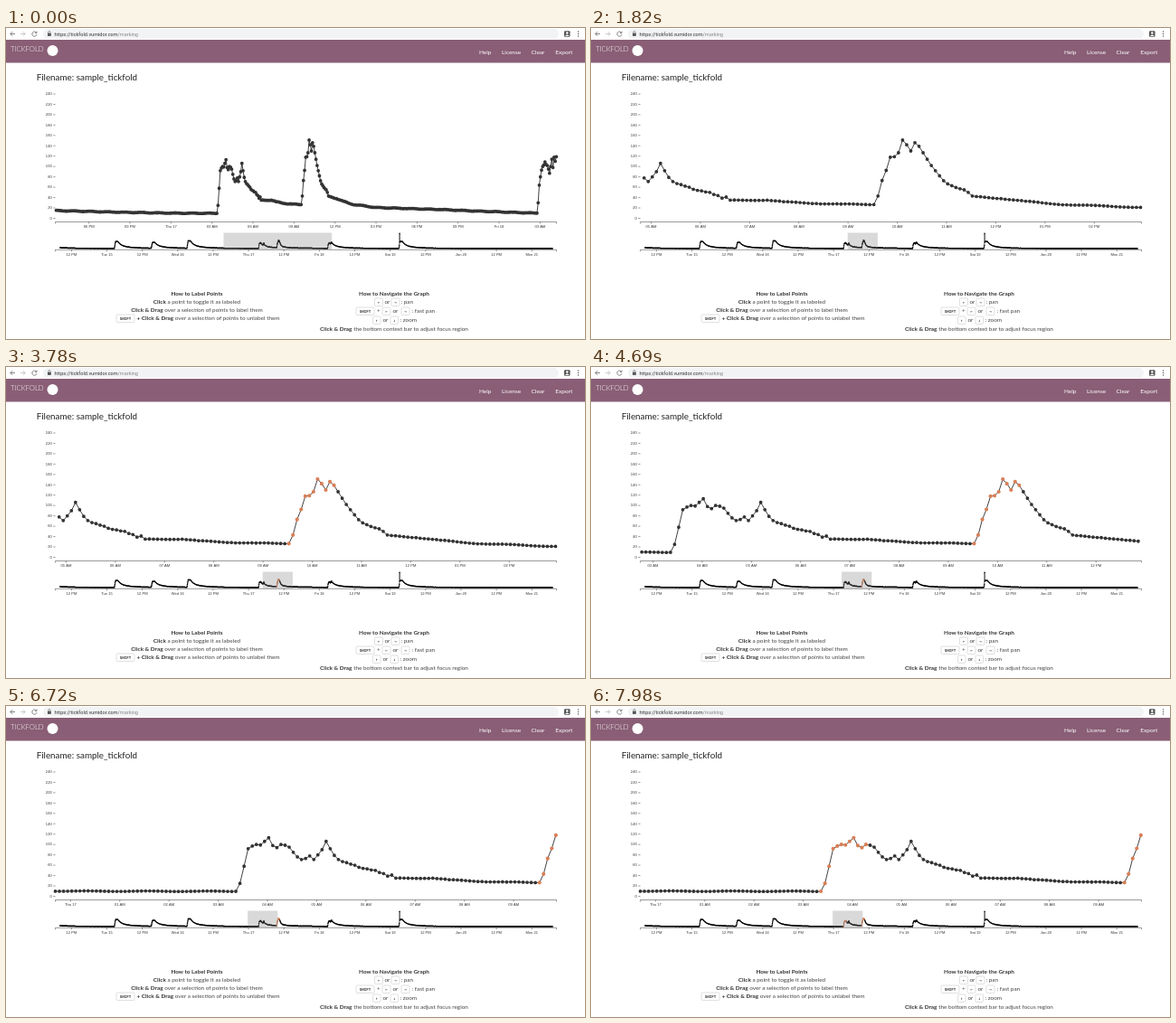
Recreate the animation shown at these times as an HTML page with a canvas. Size 640x344 px, loop 8 s.

```html
<!DOCTYPE html>
<html lang="en">
<head>
<meta charset="utf-8">
<title>Time series labeler</title>
<style>
html, body { margin: 0; width: 100%; height: 100%; overflow: hidden; background: #fff; }
svg, canvas { position: absolute; left: 0; top: 0; width: 640px; height: 344px; }
text { font: 6.4px Lato, sans-serif; fill: #444; }
.mid { text-anchor: middle; }
.b { font-weight: 700; fill: #333; }
.menu text { font-size: 6.5px; fill: #fff; }
.brand { font-size: 7.7px; font-weight: 300; fill: #fff; }
.url { font: 5.55px Roboto, sans-serif; fill: #333; }
.file { font-size: 9.85px; fill: #222; }
.keys rect { fill: #fff; stroke: #ccc; stroke-width: .6; }
.keys text { font: 700 4.2px "DejaVu Sans Mono", monospace; fill: #333; text-anchor: middle; }
.icon { fill: none; stroke: #666; stroke-width: .8; }
</style>
</head>
<body>
<svg viewBox="0 0 640 344">
  <rect x="41" y="1" width="570" height="11" rx="5.5" fill="#f1f3f4"/>
  <path class="icon" d="M10 6.5H5M7.3 4L4.8 6.5L7.3 9"/>
  <path class="icon" style="stroke:#bbb" d="M16 6.5h5M18.700 4l2.500 2.500l-2.500 2.500"/>
  <path class="icon" d="M33.500 5A2.600 2.600 0 1 0 34 7.200M34 3.600V5.500H32"/>
  <rect x="46" y="5.600" width="3.800" height="3.300" fill="#555"/>
  <path class="icon" style="stroke-width:.6" d="M46.800 5.600V4.600a1.100 1.100 0 0 1 2.200 0V5.600"/>
  <text class="url" x="53.500" y="8.500">https://tickfold.vumidor.com<tspan fill="#888">/marking</tspan></text>
  <rect x="617" y="3.200" width="6.500" height="6.500" rx="1" fill="#555"/>
  <circle cx="620.250" cy="5.500" r="1.200" fill="#fff"/>
  <path d="M618 9a2.300 1.900 0 0 1 4.500 0z" fill="#fff"/>
  <g fill="#555"><circle cx="632.500" cy="4" r=".7"/><circle cx="632.500" cy="6.500" r=".7"/><circle cx="632.500" cy="9" r=".7"/></g>

  <rect y="13" width="640" height="25.500" fill="#895e76"/>
  <text class="brand" x="5" y="26.300">TICKFOLD</text>
  <circle cx="51.500" cy="25" r="6" fill="#fff"/>
  <g class="menu">
    <text x="523" y="28.800">Help</text><text x="548" y="28.800">License</text>
    <text x="580.500" y="28.800">Clear</text><text x="607.300" y="28.800">Export</text>
  </g>
  <text class="file" x="33.700" y="58.200">Filename: sample_tickfold</text>

  <g class="mid">
    <text class="b" x="211" y="296">How to Label Points</text>
    <text x="211" y="305"><tspan class="b">Click</tspan> a point to toggle it as labeled</text>
    <text x="211" y="314"><tspan class="b">Click &amp; Drag</tspan> over a selection of points to label them</text>
    <text class="b" x="429" y="296">How to Navigate the Graph</text>
    <text x="429" y="335"><tspan class="b">Click &amp; Drag</tspan> the bottom context bar to adjust focus region</text>
  </g>
  <text x="144.500" y="323.300"><tspan class="b">+ Click &amp; Drag</tspan> over a selection of points to unlabel them</text>
  <text x="418.500" y="305">or</text><text x="436.500" y="305">: pan</text>
  <text x="410" y="315.300">+</text><text x="427.500" y="315.300">or</text><text x="448.500" y="315.300">: fast pan</text>
  <text x="416.500" y="325.300">or</text><text x="435.500" y="325.300">: zoom</text>
  <g class="keys" id="keys"></g>
</svg>
<canvas id="chart"></canvas>
<script>
const LOOP = 8000;
const LEFT = 54.5, RIGHT = 608.5, WIDTH = RIGHT - LEFT;
const DARK = '#333', ORANGE = '#d97f57';
const PER_HOUR = 12, SAMPLE_SHIFT = 0.024;

const keyCaps = [
  [122, 317, 20, 'SHIFT'], [387, 309, 20, 'SHIFT'],
  [407.5, 299, 9, '←'], [426, 299, 9, '→'],
  [416, 309, 9, '←'], [437, 309, 9, '→'],
  [405.5, 319, 8.5, '↑'], [425, 319, 8.5, '↓']
];
document.getElementById('keys').innerHTML = keyCaps.map(([x, y, w, label]) =>
  `<rect x="${x}" y="${y}" width="${w}" height="8.5" rx="1.2"/>` +
  `<text x="${x + w / 2}" y="${y + 5.7}">${label}</text>`).join('');

// Signal: hours count from Thu 17, 00:00, with one sample every five minutes.
const anchors = [];
const run = (start, values) => values.forEach((v, i) => anchors.push([start + i, v]));
anchors.push([-102, 15], [-50, 12], [-12, 10.5], [0, 10]);
run(40, [9.6, 25, 58, 92, 97, 100, 99, 106, 113, 98, 94, 100, 98.6, 95, 85, 76, 71, 73, 78, 71,
  80, 90, 106, 92, 79, 71, 67, 65, 62, 60, 56, 54, 53, 51, 50, 46, 44, 39, 41, 35]);
anchors.push([88, 35], [92, 32], [100, 28.5], [106, 27.5]);
run(114, [26.5, 43, 73, 92.5, 118, 119, 126.5, 151, 142, 130, 146, 139, 126.5, 114, 102, 92, 82,
  72.5, 66.5, 63, 59.5, 57, 55, 50, 43, 42]);
anchors.push([145, 38], [151, 33], [156, 29], [161, 26], [170, 24], [178, 21],
  [205, 19], [236, 17], [268, 14], [300, 11.5]);
run(321, [10, 30, 64, 80, 93, 100, 103, 109, 104, 102, 95, 87, 100, 114, 98, 118, 110, 119]);

const bumps = [[-70, 100], [-45.5, 118], [-33, 100], [-20.9, 125], [26.8, 108], [50.9, 120]];
function bump(d, peak) {
  if (d < 0) return 0;
  if (d < 0.4) return peak * d / 0.4;
  if (d < 1.2) return peak;
  return peak * (0.62 * Math.exp((1.2 - d) / 1.2) + 0.38 * Math.exp((1.2 - d) / 5));
}
function sampleValue(k) {
  const hour = k / PER_HOUR;
  if (k === 614) return 266;
  const i = anchors.findIndex(a => a[0] >= k);
  const wobble = Math.sin(k * 12.9898) * 0.5;
  if (i < 0 || k < anchors[0][0]) {
    return bumps.reduce((sum, [h, p]) => sum + bump(hour - h, p), 10) + wobble * 8 * (hour % 12 < 0 ? 0.2 : 0.1);
  }
  const [k1, v1] = anchors[i];
  if (k1 === k) return v1;
  const [k0, v0] = anchors[i - 1];
  return v0 + (v1 - v0) * (k - k0) / (k1 - k0) + wobble;
}
const samples = [];
for (let k = -767; k <= 1236; k++) {
  samples.push({ k, hour: k / PER_HOUR + SAMPLE_SHIFT, value: sampleValue(k) });
}

// View windows: [time, first hour, hours shown].
const CENTER = 9.87, SPAN = 10.18, PAN = 1.018;
const zoomed = span => [CENTER - span / 2, span];
const panned = n => [CENTER - SPAN / 2 - PAN * n, SPAN];
const views = [
  [0, ...zoomed(36.66)], [1050, ...zoomed(23.97)], [1470, ...zoomed(15.62)], [1820, ...zoomed(SPAN)],
  [4270, ...panned(1)], [4690, ...panned(2)],
  [5040, ...panned(3)], [5320, ...panned(4)], [5670, ...panned(5)]
];
const drags = [
  { start: 2730, end: 3780, from: [310.5, 203], to: [364.5, 114], steps: 9, lead: 1, points: [114, 125] },
  { start: 6720, end: 7210, from: [252.5, 209], to: [307, 125], steps: 5, lead: 0, points: [40, 51] }
];

const canvas = document.getElementById('chart');
const ctx = canvas.getContext('2d');
const scale = Math.max(1, window.devicePixelRatio || 1);
canvas.width = 640 * scale;
canvas.height = 344 * scale;

const mainY = v => 210.5 - v * 0.573;
const contextX = h => 268.1 + h * 3.262;
const contextY = v => 245 - (v + 6) * 0.065;

function segment(x0, y0, x1, y1) {
  ctx.beginPath();
  ctx.moveTo(x0, y0);
  ctx.lineTo(x1, y1);
  ctx.stroke();
}
function shade(x, y, w, h) {
  ctx.fillStyle = 'rgba(119,119,119,.28)';
  ctx.fillRect(x, y, w, h);
}
function tickLabel(hour) {
  const clock = ((hour % 24) + 24) % 24;
  if (clock) return String(clock % 12 || 12).padStart(2, '0') + (clock < 12 ? ' AM' : ' PM');
  const day = 17 + Math.floor(hour / 24);
  const name = ['Sun', 'Mon', 'Tue', 'Wed', 'Thu', 'Fri', 'Sat'][(day - 13) % 7];
  return (name === 'Sun' ? 'Jan' : name) + ' ' + day;
}
function timeAxis(y, toX, first, last, step) {
  ctx.strokeStyle = '#333';
  ctx.lineWidth = 0.5;
  ctx.fillStyle = '#333';
  ctx.textAlign = 'center';
  segment(LEFT, y, RIGHT, y);
  segment(LEFT, y, LEFT, y + 2);
  segment(RIGHT, y, RIGHT, y + 2);
  for (let h = Math.ceil(first / step) * step; h <= last; h += step) {
    const x = toX(h);
    segment(x, y, x, y + 2);
    ctx.fillText(tickLabel(h), x, y + 5.2);
  }
}
function valueAxis() {
  ctx.strokeStyle = ctx.fillStyle = '#333';
  ctx.lineWidth = 0.5;
  ctx.textAlign = 'right';
  for (let v = 0; v <= 240; v += 20) {
    segment(52.3, mainY(v), LEFT, mainY(v));
    ctx.fillText(v, 50.7, mainY(v) + 0.1);
  }
}
function series(points, toX, toY, style, isLabeled) {
  ctx.strokeStyle = '#111';
  ctx.lineWidth = style.line;
  ctx.beginPath();
  points.forEach(p => ctx.lineTo(toX(p.hour), toY(p.value)));
  ctx.stroke();
  for (const marked of [false, true]) {
    const r = marked ? style.markedDot : style.dot;
    ctx.fillStyle = marked ? ORANGE : style.color;
    ctx.beginPath();
    for (const p of points) {
      if (isLabeled(p.k) !== marked) continue;
      const x = toX(p.hour), y = toY(p.value);
      ctx.moveTo(x + r, y);
      ctx.arc(x, y, r, 0, Math.PI * 2);
    }
    ctx.fill();
  }
}
function drawDrag(drag, t) {
  if (t < drag.start || t >= drag.end) return;
  const n = Math.floor((t - drag.start) / 70) + drag.lead;
  const rest = 1 - Math.min(1, n / drag.steps);
  const p = 1 - rest * rest;
  const [x, bottom] = drag.from;
  const w = (drag.to[0] - x) * p, h = (bottom - drag.to[1]) * p;
  shade(x, bottom - h, w, h);
}
function draw(t) {
  const [, first, span] = views.filter(v => v[0] <= t).pop();
  const last = first + span;
  const toX = h => LEFT + (h - first) / span * WIDTH;
  const done = drags.filter(d => t >= d.end);
  const isLabeled = k => done.some(d => k >= d.points[0] && k <= d.points[1]);

  ctx.setTransform(scale, 0, 0, scale, 0, 0);
  ctx.clearRect(0, 0, 640, 344);
  ctx.font = '4.1px "Liberation Sans", sans-serif';
  ctx.textBaseline = 'middle';
  ctx.lineJoin = 'round';

  valueAxis();
  timeAxis(214.5, toX, first, last, span > 20 ? 3 : 1);
  const visible = samples.filter(p => p.hour >= first && p.hour <= last);
  series(visible, toX, mainY, { line: 0.8, dot: 1.9, markedDot: 2.1, color: DARK }, isLabeled);
  drags.forEach(d => drawDrag(d, t));

  timeAxis(245.3, contextX, -65, 104, 12);
  series(samples, contextX, contextY, { line: 0.6, dot: 0.75, markedDot: 0.8, color: '#000' }, isLabeled);
  shade(contextX(first), 226.5, contextX(last) - contextX(first), 18.5);
}

const begin = performance.now();
function frame() {
  draw((performance.now() - begin) % LOOP);
  requestAnimationFrame(frame);
}
frame();
</script>
</body>
</html>
```
